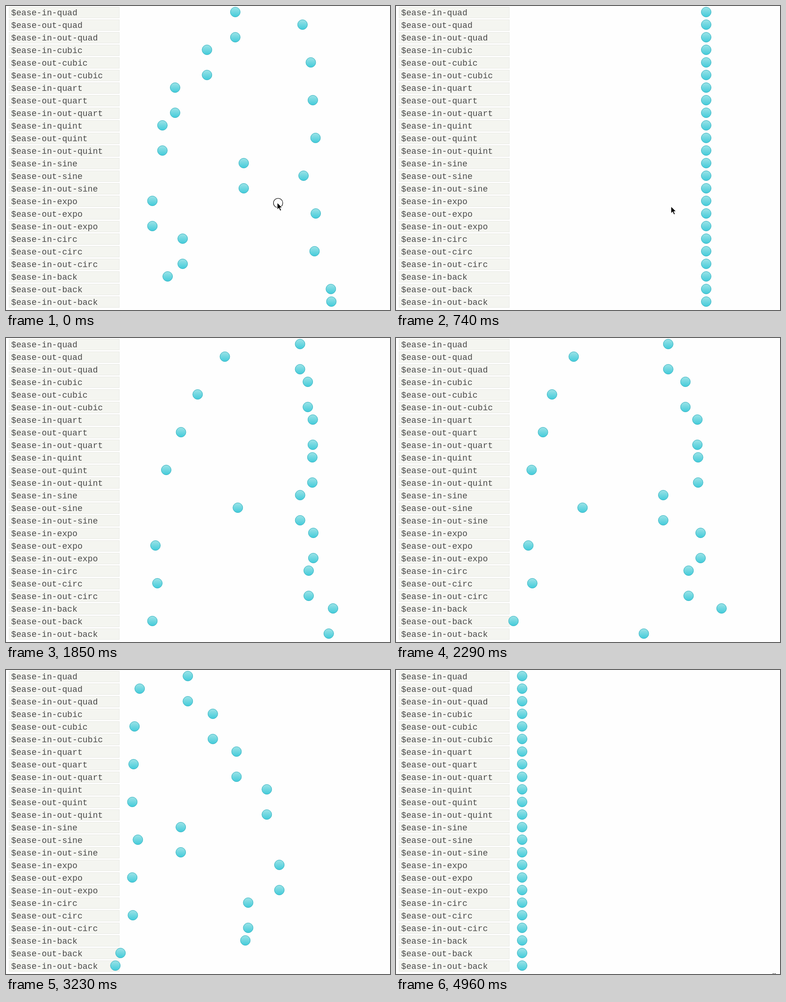
Recreate the animation shown at these times as an HTML page. Size 822 by 652 pixels, loop 5.02 s.

```html
<!DOCTYPE html>
<html lang="en">
<head>
<meta charset="utf-8">
<title>Easing curves</title>
<style>
  html, body { margin: 0; width: 100%; height: 100%; overflow: hidden; background: #fefefe; }
  svg { display: block; }
  .label rect { fill: #f4f5f0; stroke: #e9eae5; }
  .label text { font: 18.2px "Liberation Mono", monospace; fill: #4a4a4a; white-space: pre; }
  .ball { fill: url(#fill); stroke: #35b4c2; }
</style>
</head>
<body>
<svg id="stage" width="822" height="652" viewBox="0 0 822 652">
  <defs>
    <linearGradient id="fill" x1="0" y1="0" x2="0" y2="1">
      <stop offset="0" stop-color="#9ce3e7"/>
      <stop offset="1" stop-color="#42cbda"/>
    </linearGradient>
  </defs>
  <g id="labels"></g>
  <g id="balls"></g>
  <circle id="ring" cx="582.5" cy="422.5" r="10" fill="none" stroke="#111" stroke-width="1.2"/>
  <path id="cursor" d="M0 0V15.5L3.6 12.2L6.2 18L9 16.8L6.5 11.2H11.4Z" fill="#000" stroke="#fff" stroke-width="1.2"/>
  <path id="edge" d="M806 651h3v1h-3zM810 651h3v1h-3z" fill="#222"/>
</svg>
<script>
const LOOP = 5020, DURATION = 2570;
const GO = -1868, BACK = 1138;          // start of each trip
const LEFT = 270, SPAN = 394, PITCH = 27;

// name: [ease-in, ease-out]
const CURVES = {
  quad:  [[.55, .085, .68, .53],   [.25, .46, .45, .94]],
  cubic: [[.55, .055, .675, .19],  [.215, .61, .355, 1]],
  quart: [[.895, .03, .685, .22],  [.165, .84, .44, 1]],
  quint: [[.755, .05, .855, .06],  [.23, 1, .32, 1]],
  sine:  [[.47, 0, .745, .715],    [.39, .575, .565, 1]],
  expo:  [[.95, .05, .795, .035],  [.19, 1, .22, 1]],
  circ:  [[.6, .04, .98, .335],    [.075, .82, .165, 1]],
  back:  [[.6, -.28, .735, .045],  [.175, .885, .32, 1.275]]
};
const IN_OUT_BACK = [.68, -.55, .265, 1.55];

// moments at which the picture is refreshed
const STEPS = [0, 90, 200, 310, 410, 530];
for (let t = 650; t <= 1730; t += 90) STEPS.push(t);
STEPS.push(1850, 1970, 2090, 2200, 2290, 2410, 2520, 2640, 2760,
           2870, 2990, 3110, 3220, 3340, 3430, 3520, 3610, 3700, 4960);

const $ = id => document.getElementById(id);
const clamp = v => Math.min(1, Math.max(0, v));

function add(parent, tag, attrs) {
  const el = document.createElementNS("http://www.w3.org/2000/svg", tag);
  for (const key in attrs) el.setAttribute(key, attrs[key]);
  return parent.appendChild(el);
}

function bezier([x1, y1, x2, y2], x) {
  if (x <= 0 || x >= 1) return clamp(x);
  const at = (a, b, s) => 3 * (1 - s) * s * ((1 - s) * a + s * b) + s * s * s;
  let lo = 0, hi = 1;
  for (let i = 0; i < 30; i++) {
    const mid = (lo + hi) / 2;
    if (at(x1, x2, mid) < x) lo = mid; else hi = mid;
  }
  return at(y1, y2, lo);
}

const balls = [];

function addRow(name, curve) {
  const y = balls.length * PITCH;
  const label = add($("labels"), "g", { class: "label" });
  add(label, "rect", { x: 6.5, y: y + 2.5, width: 236, height: 23 });
  add(label, "text", { x: 11, y: y + 20 }).textContent = "$ease-" + name;
  const el = add($("balls"), "circle", { class: "ball", cy: y + 13, r: 10.5 });
  balls.push({ el, curve });
}

for (const name in CURVES) {
  const [easeIn, easeOut] = CURVES[name];
  addRow("in-" + name, easeIn);
  addRow("out-" + name, easeOut);
  // only the "back" row has a true in-out curve
  addRow("in-out-" + name, name === "back" ? IN_OUT_BACK : easeIn);
}

function show(id, on) {
  $(id).setAttribute("visibility", on ? "visible" : "hidden");
}

function draw(t) {
  const returning = t >= BACK;
  const p = clamp((t - (returning ? BACK : GO)) / DURATION);
  for (const { el, curve } of balls) {
    const e = bezier(curve, p);
    el.setAttribute("cx", (LEFT + SPAN * (returning ? 1 - e : e)).toFixed(2));
  }
  const move = 130 * clamp((t - 650) / 360) ** 2;
  $("cursor").setAttribute("transform", `translate(${580.5 + move} ${421.5 + move})`);
  show("cursor", t < 1100);
  show("ring", t < 90);
  show("edge", t >= 4960);
}

const start = performance.now();

function tick() {
  const now = (performance.now() - start) % LOOP;
  draw(STEPS.filter(s => s <= now).pop());
  requestAnimationFrame(tick);
}
tick();
</script>
</body>
</html>
```
